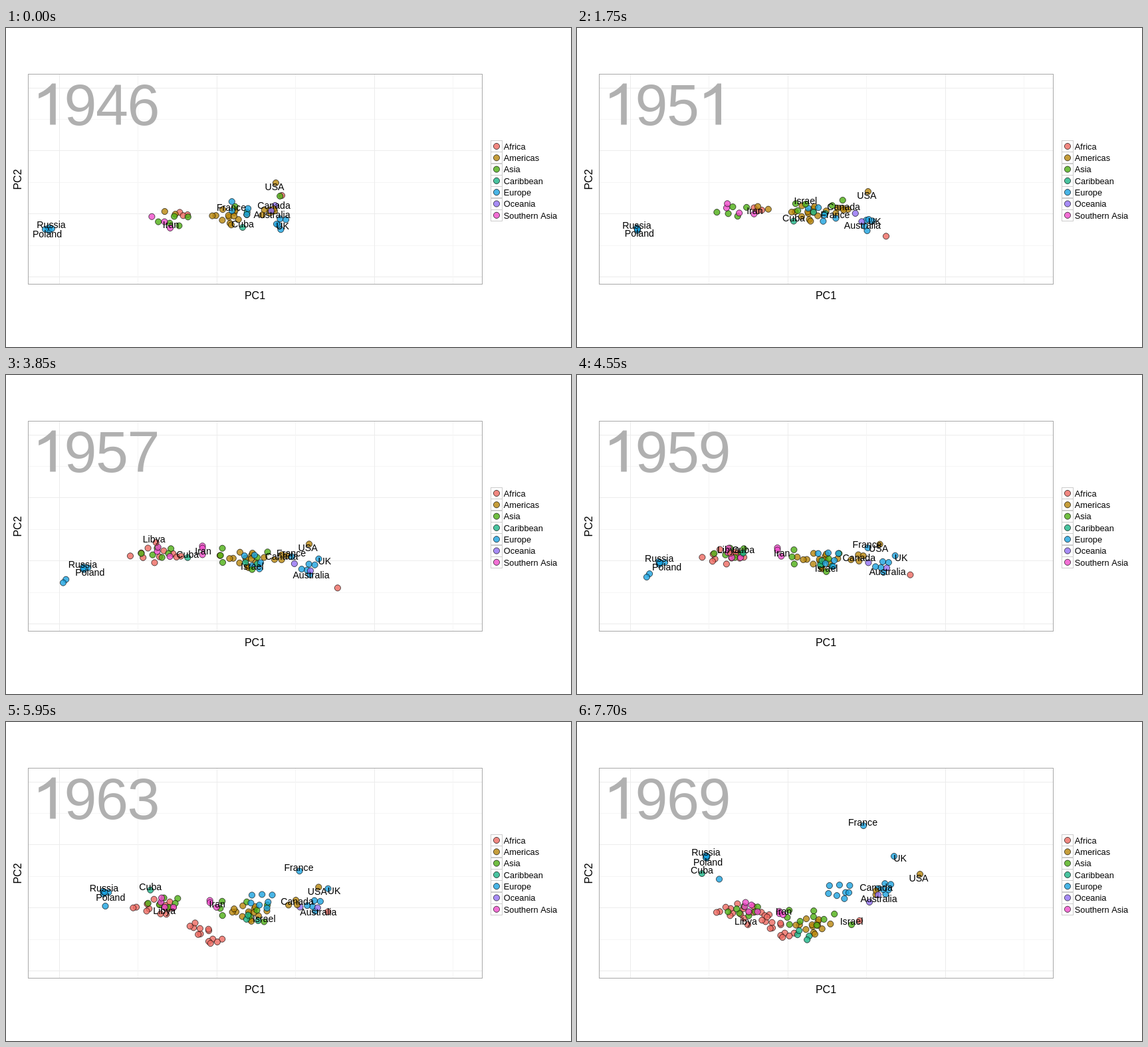
Write an HTML page that moves like this. It is 850x480 px and loops after 8000 ms.

```html
<!DOCTYPE html>
<html lang="en">
<head>
<meta charset="utf-8">
<title>PC1 and PC2 by year</title>
<style>
html, body { margin: 0; width: 100%; height: 100%; overflow: hidden; background: #fff; }
svg { display: block; width: 850px; height: 480px; font-family: "Liberation Sans", Arial, sans-serif; font-kerning: none; }
.dot { stroke: #000; stroke-opacity: .75; stroke-width: .9; fill-opacity: .8; }
.name { font-size: 14.2px; text-anchor: middle; }
.axis { font-size: 16px; text-anchor: middle; }
.key { font-size: 12.8px; }
.year { font-size: 88px; fill: #b0b0b0; }
</style>
</head>
<body>
<svg id="stage" viewBox="0 0 850 480"></svg>
<script>
const STEP = 350, LOOP = 8000, FIRST = 1946, LAST = 1969;
const KNOTS = [FIRST, 1954, 1961, LAST];
// No session was recorded in 1964.
const YEARS = Array.from({ length: 23 }, (_, i) => FIRST + i + (i > 17 ? 1 : 0));
const COLORS = {
  Africa: "#EE6A62", Americas: "#B8860B", Asia: "#4DAF14", Caribbean: "#1DB588",
  Europe: "#1CA3E0", Oceania: "#9270F5", "Southern Asia": "#F04CCB"
};

// Each path gives a place at every knot year; "dot" is the offset from name to dot.
const NATIONS = [
  { name: "USA", group: "Americas", dot: [2, -6], path: [[404, 239], [455, 260], [453, 261], [514, 235]] },
  { name: "Canada", group: "Americas", dot: [0, 5], path: [[403, 267], [400, 270], [434, 277], [450, 249]] },
  { name: "Cuba", group: "Caribbean", dot: [0, 5], path: [[356, 295], [308, 280], [227, 256], [188, 223]] },
  { name: "UK", group: "Europe", dot: [-9, -3], path: [[416, 298], [467, 287], [496, 270], [486, 205]] },
  { name: "France", group: "Europe", dot: [1, 5], path: [[339, 270], [418, 288], [444, 242], [430, 151]] },
  { name: "Poland", group: "Europe", dot: [-3, -7], path: [[62, 310], [113, 309], [144, 281], [197, 211]] },
  { name: "Russia", group: "Europe", dot: [1, 6], path: [[68, 296], [103, 297], [132, 268], [194, 196]] },
  { name: "Iran", group: "Southern Asia", dot: [-1, 5], path: [[248, 296], [279, 262], [320, 270], [311, 285]] },
  { name: "Australia", group: "Oceania", dot: [-1, -6], path: [[400, 281], [447, 307], [475, 292], [454, 266]] },
  { name: "Israel", group: "Asia", since: 1949, dot: [0, 5], path: [[312, 222], [363, 283], [380, 294], [413, 300]] },
  { name: "Libya", group: "Africa", since: 1956, dot: [3, 5], path: [[210, 190], [215, 223], [233, 279], [254, 300]] }
];

// Unnamed countries: seeded clouds with half size and first and last head count.
const CLOUDS = [
  { group: "Africa", size: [10, 17], count: [3, 3], path: [[266, 281], [274, 270], [232, 276], [282, 290]] },
  { group: "Africa", size: [0, 0], count: [1, 1], path: [[415, 252], [495, 350], [504, 281], [425, 299]] },
  { group: "Africa", since: 1956, size: [32, 13], count: [6, 13], path: [[210, 268], [210, 268], [215, 275], [240, 284]] },
  { group: "Africa", since: 1960, size: [28, 11], tilt: .5, count: [13, 13], path: [[300, 322], [300, 322], [300, 322], [302, 310]] },
  { group: "Americas", size: [30, 14], count: [13, 13], path: [[337, 284], [357, 275], [371, 281], [356, 307]] },
  { group: "Americas", size: [12, 12], count: [5, 1], path: [[395, 276], [401, 272], [430, 273], [448, 262]] },
  { group: "Americas", size: [18, 16], count: [2, 0], path: [[244, 279], [297, 267], [330, 275], [340, 295]] },
  { group: "Asia", size: [28, 10], count: [5, 7], path: [[252, 290], [222, 267], [232, 267], [250, 284]] },
  { group: "Asia", size: [48, 14], count: [2, 9], path: [[375, 258], [355, 268], [358, 276], [350, 294]] },
  { group: "Caribbean", size: [25, 9], count: [1, 4], path: [[376, 278], [365, 278], [385, 290], [345, 321]] },
  { group: "Europe", size: [4, 3], count: [2, 3], path: [[65, 303], [107, 303], [131, 275], [195, 203]] },
  { group: "Europe", since: 1956, size: [3, 5], count: [2, 1], path: [[60, 324], [60, 324], [126, 294], [212, 240]] },
  { group: "Europe", size: [20, 14], count: [3, 8], path: [[355, 270], [368, 286], [382, 274], [395, 255]] },
  { group: "Europe", size: [13, 13], count: [4, 6], path: [[411, 294], [448, 297], [463, 284], [462, 250]] },
  { group: "Oceania", size: [0, 0], count: [1, 1], path: [[405, 267], [427, 286], [443, 281], [440, 271]] },
  { group: "Southern Asia", size: [18, 10], count: [2, 5], path: [[226, 285], [235, 264], [233, 270], [259, 279]] },
  { group: "Southern Asia", since: 1956, size: [12, 3], count: [2, 2], path: [[288, 255], [288, 255], [309, 265], [306, 287]] }
];

const mix = (a, b, t) => a + (b - a) * t;
const frac = v => v - Math.floor(v);
const text = (cls, x, y, s, extra = "") => `<text class="${cls}" x="${x}" y="${y}" ${extra}>${s}</text>`;
const line = (x1, y1, x2, y2, color) => `<line x1="${x1}" y1="${y1}" x2="${x2}" y2="${y2}" stroke="${color}"/>`;
const dot = (x, y, group) =>
  `<circle class="dot" cx="${x.toFixed(1)}" cy="${y.toFixed(1)}" r="4.6" fill="${COLORS[group]}"/>`;

function place(path, year) {
  const n = Math.max(1, KNOTS.findIndex(k => k >= year));
  const t = (year - KNOTS[n - 1]) / (KNOTS[n] - KNOTS[n - 1]);
  return path[n].map((v, axis) => mix(path[n - 1][axis], v, t));
}

// An even spread of repeatable points in a disc.
function scatter(i, seed) {
  const r = Math.sqrt(frac(.5 + i * .7549 + seed * .31));
  const a = 2 * Math.PI * frac(i * .5698 + seed * .17);
  return [r * Math.cos(a), r * Math.sin(a)];
}

function cloudAt({ group, since = FIRST, size, tilt = 0, count, path }, seed, year) {
  if (year < since) return "";
  const [x, y] = place(path, year);
  const n = Math.round(mix(...count, (year - since) / (LAST - since)));
  let s = "";
  for (let i = 0; i < n; i++) {
    const [u, v] = scatter(i, seed);
    const dx = u * size[0];
    s += dot(x + dx, y + v * size[1] + dx * tilt, group);
  }
  return s;
}

function nationsAt(year) {
  let dots = "", labels = "";
  for (const { name, group, since = FIRST, dot: [dx, dy], path } of NATIONS) {
    if (year < since) continue;
    const [x, y] = place(path, year);
    dots += dot(x + dx, y + dy, group);
    labels += text("name", x.toFixed(1), (y + 5).toFixed(1), name);
  }
  return dots + labels;
}

// The figure one is drawn without a foot.
function yearTitle(year) {
  return [...String(year)].map((c, i) => {
    const x = 40.2 + 47.4 * i;
    return c === "1"
      ? `<path fill="#b0b0b0" transform="translate(${x} 0)" d="M34.6 83.5V145.5H26V97Q23 99.5 18 102T9 106V98.5Q16 95.5 21.4 91T29 83.5Z"/>`
      : text("year", x, 145.5, c);
  }).join("");
}

function grid() {
  const shade = i => i % 2 ? "#f5f5f5" : "#ececec";
  let s = "";
  for (let i = 0; i < 7; i++) {
    const y = Math.floor(90 + i * 47.4) + .5;
    s += line(34, y, 716, y, shade(i));
  }
  for (let i = 0; i < 6; i++) {
    const x = Math.floor(80 + i * 118.5) + .5;
    s += line(x, 70, x, 385, shade(i));
  }
  return s;
}

function surround() {
  let s = `<rect x="33.5" y="69.5" width="683" height="316" fill="none" stroke="#a8a8a8"/>`;
  s += text("axis", 374.5, 408, "PC1");
  s += text("axis", 0, 0, "PC2", `transform="translate(22.5 228) rotate(-90)"`);
  Object.keys(COLORS).forEach((group, i) => {
    const y = 178 + i * 17.3;
    s += `<rect x="729.5" y="${Math.round(y - 9) + .5}" width="17" height="17" fill="none" stroke="#ccc"/>`;
    s += dot(738, y, group) + text("key", 748.8, Math.round(y + 4.7), group);
  });
  return s;
}

function scene(year) {
  const clouds = CLOUDS.map((cloud, seed) => cloudAt(cloud, seed, year)).join("");
  return `<g class="scene" visibility="hidden">${yearTitle(year)}${clouds}${nationsAt(year)}</g>`;
}

const stage = document.getElementById("stage");
stage.innerHTML = grid() + YEARS.map(scene).join("") + surround();
const scenes = stage.querySelectorAll(".scene");
let shown = 0;

function tick() {
  scenes[shown].setAttribute("visibility", "hidden");
  shown = Math.floor(performance.now() % LOOP / STEP);
  scenes[shown].setAttribute("visibility", "visible");
  requestAnimationFrame(tick);
}
tick();
</script>
</body>
</html>
```
